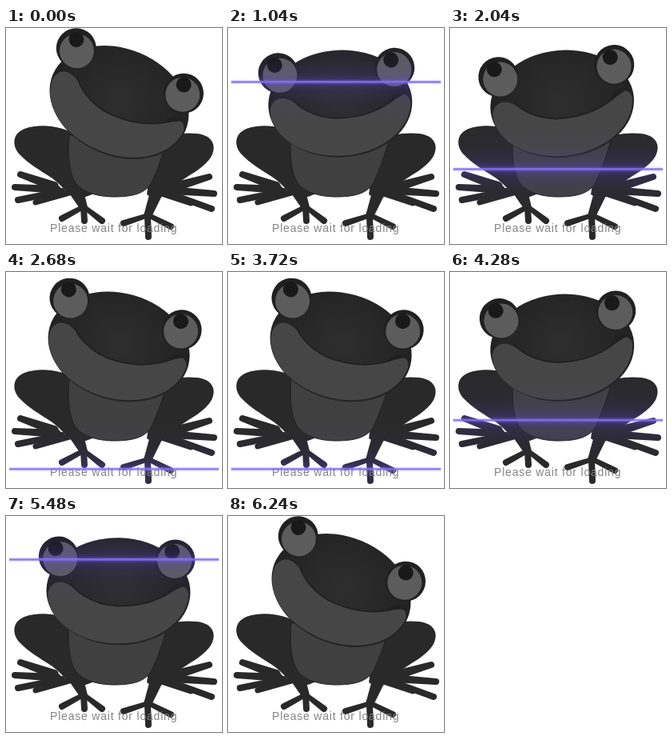
An HTML page with a canvas for the animation above (6.44 s loop, 270 by 270 pixels).

```html
<!DOCTYPE html>
<html lang="en">
<head>
<meta charset="utf-8">
<title>Loading</title>
<style>
  html, body { margin: 0; width: 100%; height: 100%; overflow: hidden; background: #fff; }
  #stage { position: absolute; left: 0; top: 0; width: 270px; height: 270px; overflow: hidden; }
  canvas { position: absolute; left: 0; top: 0; width: 270px; height: 270px; }
  #label {
    position: absolute; left: 55px; top: 242px; line-height: 17px; white-space: nowrap;
    font-family: "Liberation Sans", Arial, sans-serif; font-size: 14px; letter-spacing: .8px; color: #848484;
  }
  #beam {
    position: absolute; left: 4px; top: -4px; width: 262px; height: 8px;
    background: linear-gradient(rgba(150,130,255,0), rgba(150,130,255,.2) 28%, rgba(138,116,246,.85) 38%,
      rgba(128,104,240,.9) 60%, rgba(150,130,255,.2) 72%, rgba(150,130,255,0));
  }
</style>
</head>
<body>
<div id="stage">
  <canvas id="frog"></canvas>
  <div id="label">Please wait for loading</div>
  <div id="beam"></div>
</div>
<script>
const LOOP = 6440, STEP = 40;
const canvas = document.getElementById('frog');
const beam = document.getElementById('beam');
const ctx = canvas.getContext('2d');
const dpr = window.devicePixelRatio || 1;
canvas.width = canvas.height = Math.round(270 * dpr);

const DARK = '#292929', EDGE = '#202020', BELLY = '#404040', MOUTH = '#464646', IRIS = '#5c5c5c', PUPIL = '#191919';

function disc(x, y, r, color) {
  ctx.fillStyle = color;
  ctx.beginPath();
  ctx.arc(x, y, r, 0, Math.PI * 2);
  ctx.fill();
}

function shape(d, color) {
  ctx.fillStyle = color;
  ctx.fill(new Path2D(d));
}

function stroke(d, color, width) {
  ctx.strokeStyle = color;
  ctx.lineWidth = width;
  ctx.stroke(new Path2D(d));
}

// Tapered limb from a narrow root to a round tip
function toe(x0, y0, x1, y1, w0 = 3, w1 = 4) {
  const a = Math.atan2(y1 - y0, x1 - x0);
  ctx.fillStyle = DARK;
  ctx.beginPath();
  ctx.arc(x1, y1, w1, a - Math.PI / 2, a + Math.PI / 2);
  ctx.arc(x0, y0, w0, a + Math.PI / 2, a + Math.PI * 1.5);
  ctx.fill();
}

function drawBody() {
  shape('M88 134C70 122 42 119 23 126C8 132 7 147 17 158C27 169 43 178 58 188C70 197 76 207 86 212C94 214 106 210 114 204Z', DARK);
  shape('M186 140C203 133 222 130 239 132C257 134 264 146 257 160C249 174 232 182 219 191C207 200 199 211 187 215L176 208Z', DARK);

  toe(60, 198, 18, 183, 6);
  toe(64, 202, 11, 199, 5);
  toe(70, 204, 15, 215, 4);
  toe(78, 206, 37, 218, 4, 3.5);
  toe(88, 204, 97, 224, 9, 5);
  toe(96, 224, 70, 238);
  toe(97, 224, 98, 241, 4);
  toe(98, 224, 120, 241);

  toe(210, 199, 254, 186, 6);
  toe(206, 203, 260, 207, 5);
  toe(202, 206, 257, 226, 4);
  toe(196, 207, 231, 219, 4, 3.5);
  toe(188, 206, 177, 235, 8, 5);
  toe(178, 234, 147, 244);
  toe(177, 236, 178, 261, 4);
  toe(178, 234, 206, 248);

  const belly = 'M79 134C77 154 78 178 86 192C94 205 114 211 135 211C158 211 176 207 183 191C189 177 196 160 201 140Z';
  shape(belly, BELLY);
  stroke(belly, EDGE, 1);
}

function drawEye(x, y, dx, dy) {
  disc(x, y, 25, EDGE);
  disc(x + dx, y + dy, 21.5, IRIS);
  disc(x - 4, y - 10, 9.5, PUPIL);
}

function drawHead(angle) {
  ctx.save();
  ctx.translate(144.4, 96.4);
  ctx.rotate(angle * Math.PI / 180);

  const skin = ctx.createRadialGradient(-4, -5, 10, -4, -5, 90);
  skin.addColorStop(0, '#2d2d2d');
  skin.addColorStop(1, '#222');
  ctx.fillStyle = skin;
  ctx.beginPath();
  ctx.ellipse(-4, -2, 90, 67, 0, 0, Math.PI * 2);
  ctx.fill();

  shape('M-92 4C-91 -8 -82 -14 -72 -11C-62 -8 -58 -3 -46 5C-32 13 -20 16 -5 16C25 16 50 7 68 -8C76 -13 83 -9 84 0C82 36 42 63 -5 63C-54 63 -91 36 -92 4Z', MOUTH);
  stroke('M-64 -11C-59 -3 -53 1 -46 5C-32 13 -20 16 -5 16C25 16 50 7 68 -8', EDGE, 1.8);
  shape('M57 -1C60 -10 69 -16 80 -12C73 -9 65 -4 57 -1Z', EDGE);

  drawEye(-79.8, -43.7, 2, 3);
  drawEye(65.8, -43.7, -.5, 2);
  ctx.restore();
}

// Violet light that only falls on the frog
function drawGlow(y) {
  ctx.save();
  ctx.globalCompositeOperation = 'source-atop';
  const g = ctx.createLinearGradient(0, y - 60, 0, y + 60);
  const stops = [[0, 0], [.28, .05], [.42, .16], [.5, .42], [.58, .16], [.72, .05], [1, 0]];
  for (const [at, alpha] of stops) g.addColorStop(at, `rgba(92,70,225,${alpha})`);
  ctx.fillStyle = g;
  ctx.fillRect(0, y - 60, 270, 120);
  ctx.restore();
}

// cubic-bezier(.42, 0, .58, 1)
function easeInOut(x) {
  let lo = 0, hi = 1;
  for (let i = 0; i < 24; i++) {
    const s = (lo + hi) / 2, r = 1 - s;
    if (1.26 * s * r * r + 1.74 * s * s * r + s * s * s < x) lo = s; else hi = s;
  }
  return lo * lo * (3 - 2 * lo);
}

function draw(time) {
  const tick = Math.floor((time % LOOP) / STEP) * STEP;
  const t = Math.min(3040, Math.max(160, Math.min(tick, LOOP - STEP - tick)));
  const y = 67.5 + (t - 1040) * .109;
  const angle = -11.5 + 35 * easeInOut(Math.abs(t - 1600) / 1600);

  ctx.setTransform(dpr, 0, 0, dpr, 0, 0);
  ctx.clearRect(0, 0, 270, 270);
  drawBody();
  drawHead(angle);
  if (y > -20) drawGlow(y);
  beam.style.transform = `translateY(${y}px)`;
}

const start = performance.now();
function frame() {
  draw(performance.now() - start);
  requestAnimationFrame(frame);
}
frame();
</script>
</body>
</html>
```
